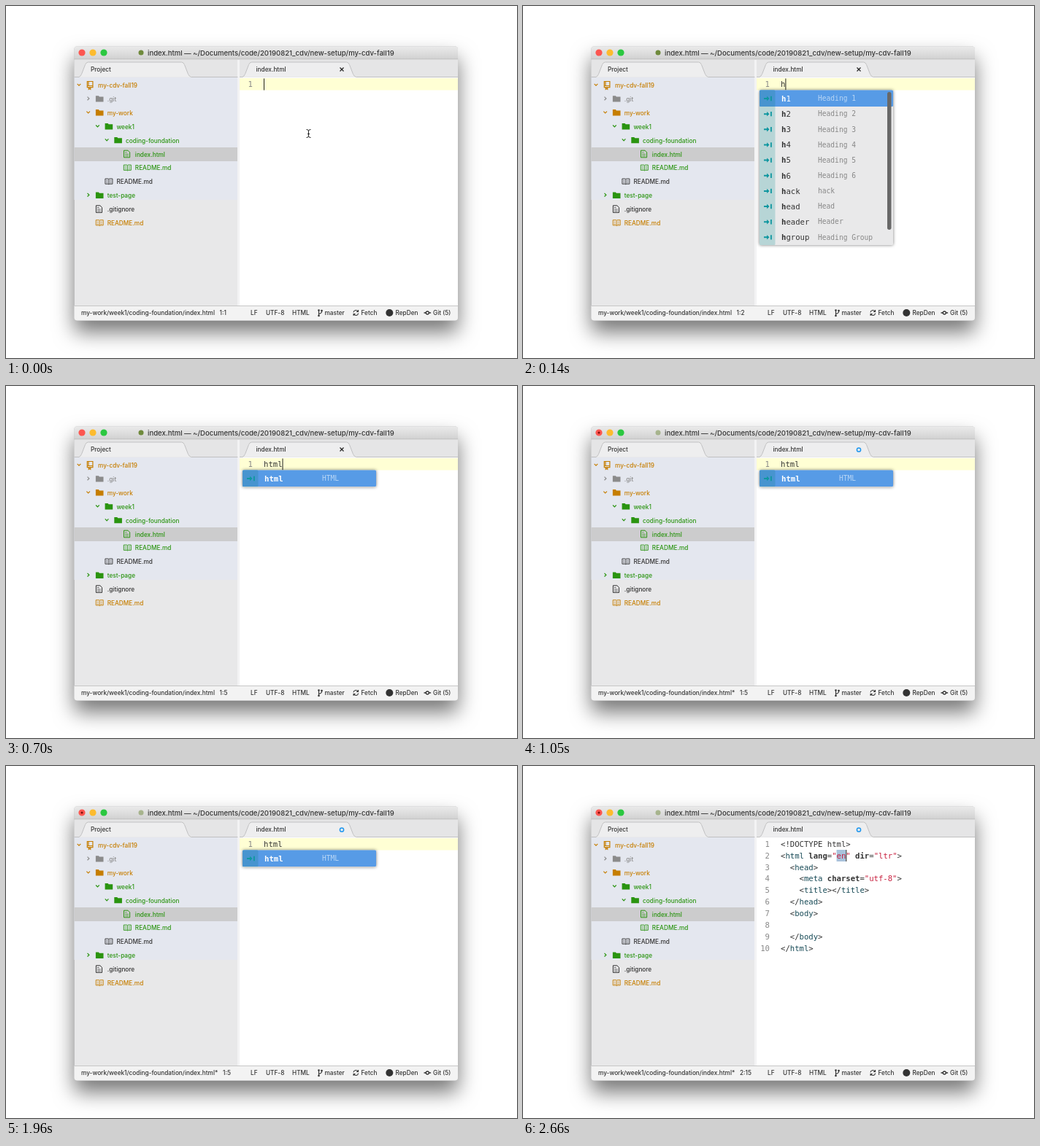
Recreate the animation shown at these times as an HTML page. Size 700 by 483 pixels, loop 2730 ms.

```html
<!DOCTYPE html>
<html lang="en">
<head>
<meta charset="utf-8">
<title>Editor snippet</title>
<style>
  html, body { margin: 0; width: 100%; height: 100%; overflow: hidden; background: #fff; }
  svg { display: block; }
  text { font: 500 8.25px Inter, sans-serif; fill: #333; white-space: pre; }
  .title { font-size: 9.55px; }
  .code { font: 10.6px "DejaVu Sans Mono", monospace; }
  .hint { font: 9.6px "DejaVu Sans Mono", monospace; fill: #888; }
  .number { fill: #888; text-anchor: end; }
  .string { fill: #c8203f; }
  .attr { font-weight: bold; }
  .tag { fill: #174a56; }
  .window { fill: #e8e8e9; filter: drop-shadow(0 0 .5px #0006) drop-shadow(0 16px 14px #0008); }
  .popup { filter: drop-shadow(0 0 2px #0008); }
  .line { fill: none; stroke: currentColor; }
</style>
</head>
<body>
<svg width="700" height="483" viewBox="0 0 700 483">
  <defs>
    <linearGradient id="bar" x2="0" y2="1">
      <stop stop-color="#ebebeb"/><stop offset="1" stop-color="#d1d1d1"/>
    </linearGradient>
    <clipPath id="frame"><rect x="93.5" y="55.5" width="525.5" height="376" rx="4"/></clipPath>
    <path id="folder" d="M.2-4.2h4l1 1.300h5.600V4.200H.2z" fill="currentColor"/>
    <g id="file" class="line">
      <path d="M.7-4.800h5.500l2.600 2.600V4.800H.7z"/><path d="M2.200-2h2.500M2.200.4h5M2.200 2.700h5" stroke-width=".7"/>
    </g>
    <g id="book" class="line">
      <path d="M.5-3.800h4.200l.8.7.8-.7h4.200v7.200H6.300l-.8.7-.8-.7H.5zM5.500-3v7" stroke-width=".9"/>
      <path d="M1.800-1.600h2.300M1.800.2h2.300M1.800 2h2.300M6.900-1.600h2.300M6.900.2h2.300M6.900 2h2.300" stroke-width=".55"/>
    </g>
    <path id="repo" class="line" d="M1.300-5h7.600v8.200H1.300zM3-5v6M1.300 1h7.600M3.300 3.200v2.600l1.200-1 1.200 1V3.200" stroke-width="1.200"/>
    <path id="open" class="line" d="M-2.300-1.200 0 1.200 2.300-1.200" stroke-width="1.200"/>
    <path id="closed" class="line" d="M-1.200-2.300 1.200 0-1.200 2.300" stroke-width="1.200"/>
    <path id="expand" d="M0-1h4v-2.200L7.500 0 4 3.200V1H0zM9-3.200h1.800v6.400H9z" fill="#0f97a0"/>
  </defs>

  <rect class="window" x="93.5" y="55.5" width="525.5" height="376" rx="4"/>
  <g clip-path="url(#frame)">
    <rect x="93" y="55" width="527" height="18" fill="url(#bar)"/>
    <path d="M93 73h527" stroke="#b8b8b8"/>
    <rect x="93" y="73.5" width="527" height="24.5" fill="#e5e5e6"/>
    <rect x="93" y="98" width="224" height="168" fill="#e4e7ef"/>
    <rect x="93" y="194" width="224" height="19" fill="#cccccd"/>
    <rect x="320" y="98" width="300" height="313" fill="#fff"/>
    <rect x="317" y="74" width="3" height="337" fill="#f3f3f4"/>
    <g fill="#eeeeef" stroke="#c0c0c1">
      <path d="M93 97.500h7q2-1 3.500-4l5-13q1.500-3.500 4-3.500h128q2.500 0 4 3.500l5 13q1.500 3 4 4h64"/>
      <path d="M320 97.500h4q2-1 3.500-4l5-13q1.500-3.500 4-3.500h130q2.500 0 4 3.500l5 13q1.500 3 4 4h141"/>
    </g>
    <rect x="93" y="411" width="527" height="21" fill="#f3f3f3"/>
    <path d="M93 411.500h527" stroke="#c6c6c6"/>
  </g>
  <circle cx="104" cy="64" r="4.600" fill="#fc5650"/>
  <circle cx="119" cy="64" r="4.600" fill="#fdbb2e"/>
  <circle cx="134" cy="64" r="4.600" fill="#2bc840"/>
  <text class="title" x="194" y="67.500">index.html — ~/Documents/code/20190821_cdv/new-setup/my-cdv-fall19</text>
  <text x="116" y="90">Project</text>
  <text x="342.500" y="90">index.html</text>
  <g id="tree"></g>

  <text x="335" y="424">LF</text>
  <text x="356" y="424">UTF-8</text>
  <text x="392" y="424">HTML</text>
  <text x="436.500" y="424">master</text>
  <text x="486.500" y="424">Fetch</text>
  <text x="533.500" y="424">RepDen</text>
  <text x="585" y="424">Git (5)</text>
  <g class="line" color="#333">
    <path d="M428.500 418v6.500M432.500 418v1.500q0 2-4 3" stroke-width="1.100"/>
    <path d="M476 420.500a3.300 3.300 0 0 1 6.200-1.300M482.600 421.500a3.300 3.300 0 0 1-6.200 1.300M482.500 417v2.500h-2.500M476.100 425v-2.500h2.500" stroke-width="1.100"/>
    <path d="M572.500 421h2.800M579.300 421h2.800" stroke-width="1.300"/>
    <circle cx="577.300" cy="421" r="2" stroke-width="1.300"/>
  </g>
  <g fill="#333">
    <circle cx="428.500" cy="417.500" r="1.300"/><circle cx="428.500" cy="425" r="1.300"/>
    <circle cx="432.500" cy="418" r="1.300"/><circle cx="525.300" cy="421" r="5"/>
  </g>
  <g id="live"></g>
</svg>

<script>
const LOOP = 2730, STEP = 70;
const CHAR = 6.38, CODE_X = 353, LINE = 15.88, ROW = 21.15;
const GREEN = '#2a9410', ORANGE = '#c67e00', DARK = '#333';

// label, depth, colour, icon, chevron
const tree = [
  ['my-cdv-fall19', 0, ORANGE, 'repo', 'open'],
  ['.git', 1, '#8b8b8b', 'folder', 'closed'],
  ['my-work', 1, ORANGE, 'folder', 'open'],
  ['week1', 2, GREEN, 'folder', 'open'],
  ['coding-foundation', 3, GREEN, 'folder', 'open'],
  ['index.html', 4, GREEN, 'file'],
  ['README.md', 4, GREEN, 'book'],
  ['README.md', 2, DARK, 'book'],
  ['test-page', 1, GREEN, 'folder', 'closed'],
  ['.gitignore', 1, DARK, 'file'],
  ['README.md', 1, ORANGE, 'book'],
];

const snippet = `<!DOCTYPE html>
<html lang="en" dir="ltr">
  <head>
    <meta charset="utf-8">
    <title></title>
  </head>
  <body>

  </body>
</html>`.split('\n');

const headings = [1, 2, 3, 4, 5, 6].map(n => ['h' + n, 'Heading ' + n]);
const allHints = [...headings, ['hack', 'hack'], ['head', 'Head'], ['header', 'Header'], ['hgroup', 'Heading Group']];

const text = (x, y, content, attrs = '') => `<text x="${x}" y="${y}" ${attrs}>${content}</text>`;
const rect = (x, y, w, h, fill, attrs = '') =>
  `<rect x="${x}" y="${y}" width="${w}" height="${h}" fill="${fill}" ${attrs}/>`;
const icon = (name, x, y, color = DARK) => `<use href="#${name}" x="${x}" y="${y}" color="${color}"/>`;
const baseline = i => 110.8 + i * LINE;
const caret = (x, y) => rect(x, y, 1, 16, '#222');

document.getElementById('tree').innerHTML = tree.map(([label, depth, color, name, chevron], i) => {
  const x = 110 + depth * 12.7, y = 109 + i * 18.9;
  return (chevron ? icon(chevron, x - 10, y - 1, color) : '') + icon(name, x, y - 0.5, color) +
    text(x + 16, y + 3, label, `style="fill:${color}"`);
}).join('');

function highlight(line) {
  const escaped = line.replace(/</g, '&lt;').replace(/>/g, '&gt;');
  return escaped.replace(/("[^"]*")|([a-z]+)(?==)|(?<=&lt;\/?)[a-z]+/g, (token, string, attr) =>
    `<tspan class="${string ? 'string' : attr ? 'attr' : 'tag'}">${token}</tspan>`);
}

function popup(typed) {
  const full = typed.length === 1;
  const hints = full ? allHints : [['html', 'HTML']];
  const height = full ? 212.5 : 23;
  const rows = hints.map(([word, description], i) => {
    const y = 127 + i * ROW, white = i ? '' : 'style="fill:#fff"';
    const n = typed.length;
    return icon('expand', 330, y) +
      text(354, y + 3.8, `<tspan font-weight="bold">${word.slice(0, n)}</tspan>${word.slice(n)}`, `class="code" ${white}`) +
      text(full ? 404 : 433, y + 3.2, description, `class="hint" ${i ? '' : 'style="fill:#b9d6f5"'}`);
  }).join('');
  return `<g class="popup">${rect(324, 115.5, 183, height, '#e9e9ea', 'rx="1.5"')}</g>` +
    rect(324, 115.5, 21.5, height, '#b7d5d6', 'rx="1.5"') +
    rect(324, 115.5, 183, 22.5, '#579be6', 'rx="1.5"') +
    rect(324, 115.5, 21.5, 22.5, '#4794cf', 'rx="1.5"') + rows +
    (full ? rect(499, 118, 5.5, 189, '#686868', 'rx="2.7"') : '');
}

function editor(t, typed) {
  if (t >= 2590) {
    return rect(CODE_X + 12 * CHAR, 115, 2 * CHAR, 16, '#a9c3dc') +
      snippet.map((line, i) =>
        text(338, baseline(i), i + 1, 'class="code number"') +
        text(CODE_X, baseline(i), highlight(line), 'class="code"')).join('') +
      caret(CODE_X + 14 * CHAR, 115);
  }
  const caretOn = t < 840 || Math.floor((t - 790) / 400) % 2 === 1;
  return rect(320, 99, 299, 16.5, '#ffffd4') +
    text(338, baseline(0), 1, 'class="code number"') +
    text(CODE_X, baseline(0), typed, 'class="code"') +
    (caretOn ? caret(CODE_X + typed.length * CHAR, 99.5) : '') +
    (t >= 140 ? popup(typed) : '');
}

function scene(t) {
  const typed = 'html'.slice(0, [70, 210, 350, 490].filter(key => t >= key).length);
  const modified = t >= 840;
  const position = t >= 2590 ? '2:15' : '1:' + (typed.length + 1);
  return editor(t, typed) +
    `<circle cx="185" cy="64" r="3.5" fill="#6f8a3c" opacity="${modified ? 0.5 : 1}"/>` +
    (modified
      ? '<circle cx="104" cy="64" r="1.5" fill="#7d0f0a"/><circle cx="460" cy="87.5" r="2.6" fill="none" stroke="#1e96ee" stroke-width="1.5"/>'
      : '<path d="M457.5 84.5l5 5m0-5l-5 5" stroke="#222" stroke-width="1.2"/>') +
    text(103, 424, 'my-work/week1/coding-foundation/index.html' + (modified ? '*' : '')) +
    text(modified ? 297 : 292.5, 424, position) +
    (t < STEP ? '<path d="M411.5 169.5q3 0 3 2v7q0 2 3 2m-6 0q3 0 3-2v-7q0-2 3-2M413 175.5h3" fill="none" stroke="#222"/>' : '');
}

const live = document.getElementById('live');
let shown = '';
function draw() {
  const t = Math.floor(performance.now() % LOOP / STEP) * STEP;
  const markup = scene(t);
  if (markup !== shown) live.innerHTML = shown = markup;
  requestAnimationFrame(draw);
}
draw();
</script>
</body>
</html>
```
